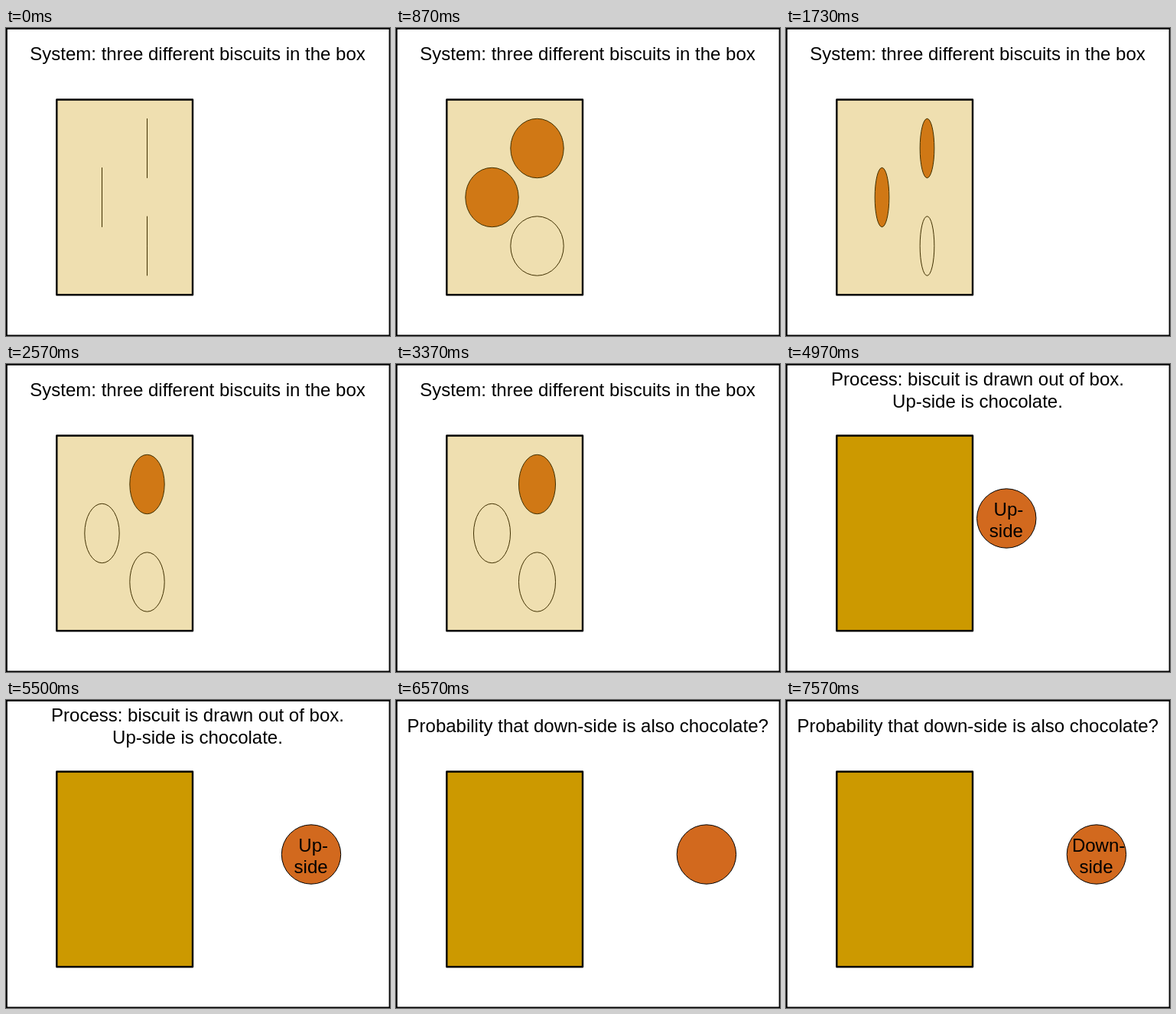
An HTML page with a canvas for the animation above (9.57 s loop, 502 px wide and 402 px high).

```html
<!DOCTYPE html>
<html lang="en">
<head>
<meta charset="utf-8">
<title>Three biscuits</title>
<style>
  html, body { margin: 0; width: 100%; height: 100%; overflow: hidden; background: #fff; }
  canvas { display: block; width: 502px; height: 402px; }
</style>
</head>
<body>
<canvas id="stage" width="502" height="402"></canvas>
<script>
const ctx = document.getElementById('stage').getContext('2d');
const LOOP = 9570;
const CHOC = '#d2691e', PLAIN = '#fff', BOX = '#cc9900';
const R = 38.7, LINE = 28.8;

// Tick ranges at 30 ticks per second
const FADE = 120, PULL = 137, ASK = 197, REVEAL = 227;

// Each biscuit: centre, first side, second side
const biscuits = [
  [184.5, 157, CHOC, CHOC],
  [125.5, 221, CHOC, PLAIN],
  [184.5, 284.5, PLAIN, PLAIN]
];

const clamp = v => Math.min(1, Math.max(0, v));

function biscuit(x, y, open, fill) {
  ctx.beginPath();
  ctx.ellipse(x, y, R * open, R, 0, 0, Math.PI * 2);
  ctx.fillStyle = fill;
  ctx.fill();
  ctx.lineWidth = 1;
  ctx.strokeStyle = '#000';
  ctx.stroke();
}

function text(lines, x, y, alpha = 1) {
  ctx.globalAlpha = alpha;
  ctx.fillStyle = '#000';
  lines.forEach((s, i) => ctx.fillText(s, x, y + (i - (lines.length - 1) / 2) * LINE));
  ctx.globalAlpha = 1;
}

function label(word, x, y) {
  text([word], x + 2.7, y - 3.6);
  text(['side'], x - 0.4, y + 24.9);
}

// Four alternating sweeps: open, close, open, close
function spin(n) {
  if (n >= FADE) return 0;
  const sweep = Math.floor(n / 30), k = (n % 30) / 29;
  return sweep % 2 ? 1 - k : k;
}

function flip(n) {
  const k = n - ASK;
  if (k < 0 || k > 29) return 1;
  return k < 15 ? 1 - k / 14 : (k - 15) / 14;
}

function draw(n) {
  ctx.fillStyle = '#fff';
  ctx.fillRect(0, 0, 502, 402);

  const fade = clamp(Math.floor((n - FADE) / 2) / 8);

  if (n < PULL) {
    for (const [x, y, a, b] of biscuits) biscuit(x, y, spin(n), n < 60 ? a : b);
  } else {
    const x = 205.2 + 200.7 * clamp((n - PULL) / 29), y = 201.5;
    biscuit(x, y, flip(n), CHOC);
    if (n < ASK) label('Up-', x, y);
    else if (n >= REVEAL) label('Down-', x, y);
  }

  // The box covers whatever is inside it
  ctx.globalAlpha = 0.31 + 0.69 * fade;
  ctx.fillStyle = BOX;
  ctx.fillRect(66.3, 93.5, 177.7, 254.7);
  ctx.globalAlpha = 1;
  ctx.lineWidth = 2.4;
  ctx.strokeStyle = '#000';
  ctx.strokeRect(66.3, 93.5, 177.7, 254.7);
  ctx.strokeRect(0.6, 0.6, 501.2, 401.2);

  if (n >= ASK) {
    text(['Probability that down-side is also chocolate?'], 250.7, 42);
  } else {
    if (fade < 1) text(['System: three different biscuits in the box'], 250.5, 42, 1 - fade);
    if (fade > 0) text(['Process: biscuit is drawn out of box.', 'Up-side is chocolate.'], 250.5, 42.4, fade);
  }
}

ctx.font = '24px "Liberation Sans", Arial, sans-serif';
ctx.textAlign = 'center';
ctx.lineJoin = 'round';

const start = performance.now();
function tick() {
  const t = (performance.now() - start) % LOOP;
  draw(Math.floor((Math.floor(t / 10) + 0.5) * 0.3));
  requestAnimationFrame(tick);
}
tick();
</script>
</body>
</html>
```
